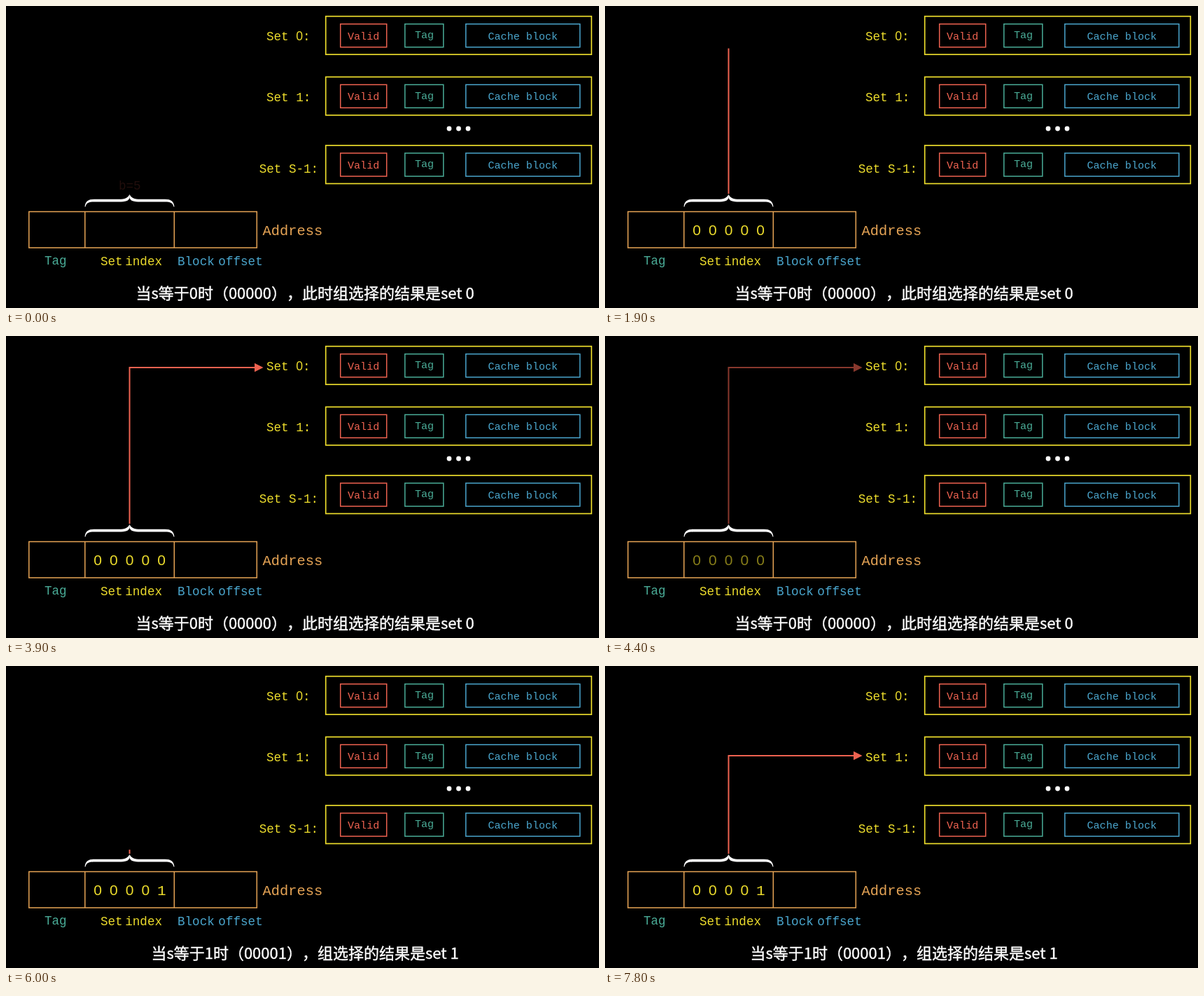
These frames come from a looping animation (847x431 px, 8 s). An HTML page:

```html
<!DOCTYPE html>
<html lang="zh">
<head>
<meta charset="utf-8">
<title>Cache set selection</title>
<style>
  html, body { margin: 0; width: 100%; height: 100%; overflow: hidden; background: #000; }
  svg { display: block; width: 100vw; height: 100vh; }
  text { font-family: "Liberation Mono", "Courier New", monospace; font-size: 17.6px; }
  .small { font-size: 15.1px; }
  .big { font-size: 20.4px; }
  .zero { font-family: "Liberation Sans", Arial, sans-serif; }
  .digit { font-size: 21px; text-anchor: middle; }
  .caption {
    font: 500 22px "Noto Sans CJK SC", "Noto Sans CJK", sans-serif;
    font-feature-settings: "chws" 0, "halt" 0;
    text-spacing-trim: space-all;
    text-anchor: middle;
    stroke: #fff;
    stroke-width: 0.4;
  }
</style>
</head>
<body>
<svg id="stage" viewBox="0 0 847 431"></svg>
<script>
const LOOP = 8000;
const RED = '#ee6250', TEAL = '#4aac97', BLUE = '#4aa5cc',
      YELLOW = '#ecdc2c', GOLD = '#e6a455', WHITE = '#fff';
const FLOOR = 268, STEM = 176.5, TIP = 367.5;

const stage = document.getElementById('stage');

const rect = (x, y, w, h, color, line = 1.5) =>
  `<rect x="${x}" y="${y}" width="${w}" height="${h}" fill="none" stroke="${color}" stroke-width="${line}"/>`;
const label = (x, y, str, color, cls = '', extra = '') =>
  `<text x="${x}" y="${y}" fill="${color}" class="${cls}" ${extra}>${str}</text>`;

function cacheSet(y, name, x, base) {
  return rect(456.7, y, 379.6, 54.5, YELLOW, 1.7) +
    label(x, base, name, YELLOW) +
    rect(477.7, y + 11, 66, 33, RED) + label(488, y + 33, 'Valid', RED, 'small') +
    rect(569.8, y + 11, 55, 33, TEAL) + label(584, y + 31.3, 'Tag', TEAL, 'small') +
    rect(656.8, y + 11, 163, 33, BLUE) + label(688.5, y + 33, 'Cache block', BLUE, 'small');
}

function brace() {
  const half = 'M112.5 286.5 C113.5 279 117 275.8 126 275.8 L161 275.8 C170 275.8 174 274 176.5 268.8' +
    ' L176.6 273.5 C175.5 278 171 279.6 161 279.6 L126 279.6 C118 279.6 115 281 113.5 286.5 Z';
  return `<path d="${half}" fill="#fff"/><path d="${half}" fill="#fff" transform="translate(353) scale(-1 1)"/>`;
}

// One round: digits are written, the stem rises, the arrow grows.
const rounds = [
  { bits: '00000', y: 45, start: 1150, fade: 3930 },
  { bits: '00001', y: 128, start: 5800, fade: Infinity }
];

const roundMarkup = r => '<g class="round">' +
  [...r.bits].map((b, i) =>
    label(131 + i * 22.8, 327, b, YELLOW, 'digit' + (b === '0' ? ' zero' : ''),
      `stroke="${YELLOW}"`)).join('') +
  `<path class="stem" fill="none" stroke="${RED}" stroke-width="2"/>` +
  `<path class="head" fill="${RED}"/></g>`;

const captions = [
  '当s等于0时（00000），此时组选择的结果是set 0',
  '当s等于1时（00001），组选择的结果是set 1'
];

stage.innerHTML =
  cacheSet(14.7, 'Set <tspan class="zero">0</tspan>:', 372, 49) +
  cacheSet(101.3, 'Set 1:', 372, 135.5) +
  cacheSet(199, 'Set S-1:', 361.7, 238) +
  [633, 646.5, 660].map(x => `<circle cx="${x}" cy="175" r="3.4" fill="#fff"/>`).join('') +
  rect(32.8, 293.5, 325.5, 51.5, GOLD) +
  `<path d="M112.8 293.5V345M240.3 293.5V345" stroke="${GOLD}" stroke-width="1.5"/>` +
  label(366.5, 326.7, 'Address', GOLD, 'big') +
  label(55, 368.5, 'Tag', TEAL) +
  label(135, 370, 'Set index', YELLOW, '', 'style="word-spacing:-7px"') +
  label(245, 370, 'Block offset', BLUE, '', 'style="word-spacing:-5px"') +
  brace() +
  label(161, 262, 'b=5', RED, '', 'id="width"') +
  rounds.map(roundMarkup).join('') +
  captions.map(c => label(427, 418, c, WHITE, 'caption')).join('');

const widthLabel = document.getElementById('width');
const captionEls = stage.querySelectorAll('.caption');
const groups = [...stage.querySelectorAll('.round')].map(g => ({
  g,
  digits: [...g.querySelectorAll('.digit')],
  stem: g.querySelector('.stem'),
  head: g.querySelector('.head')
}));

const clamp = v => Math.min(1, Math.max(0, v));
const sigmoid = x => 1 / (1 + Math.exp(-x));
function smooth(v) {
  const edge = sigmoid(-5);
  return clamp((sigmoid(10 * (clamp(v) - 0.5)) - edge) / (1 - 2 * edge));
}
const ease = (t, start, span = 1000) => smooth((t - start) / span);

// Outline first, then fill.
function writeDigit(el, p) {
  const outline = smooth(p * 2), fill = smooth(p * 2 - 1);
  el.style.visibility = p > 0 ? 'visible' : 'hidden';
  el.setAttribute('fill-opacity', fill);
  el.setAttribute('stroke-width', 0.9 * (1 - fill));
  el.setAttribute('stroke-dasharray', outline < 1 ? `${48 * outline} 100` : 'none');
}

function drawRound(r, { g, digits, stem, head }, t) {
  g.setAttribute('opacity', 1 - ease(t, r.fade));
  const w = clamp((t - r.start + 850) / 850) * 1.8;
  digits.forEach((d, i) => writeDigit(d, clamp(w - i * 0.2)));

  const up = ease(t, r.start), out = ease(t, r.start + 1000);
  const y = FLOOR + (r.y - FLOOR) * up;
  const x = STEM + (TIP - STEM) * out;
  const size = 12.5 * out;
  stem.setAttribute('d', up > 0 ? `M${STEM} ${FLOOR}V${y}` + (out > 0 ? `H${x - size}` : '') : '');
  head.setAttribute('d', out > 0 ? `M${x} ${y}l${-size} ${-size / 2}v${size}z` : '');
}

function draw(t) {
  widthLabel.setAttribute('opacity', 1 - ease(t, -680));
  rounds.forEach((r, i) => drawRound(r, groups[i], t));
  const current = t < 5200 ? 0 : 1;
  captionEls.forEach((el, i) => { el.style.visibility = i === current ? 'visible' : 'hidden'; });
}

const begin = performance.now();
function tick() {
  draw((performance.now() - begin) % LOOP);
  requestAnimationFrame(tick);
}
tick();
</script>
</body>
</html>
```
